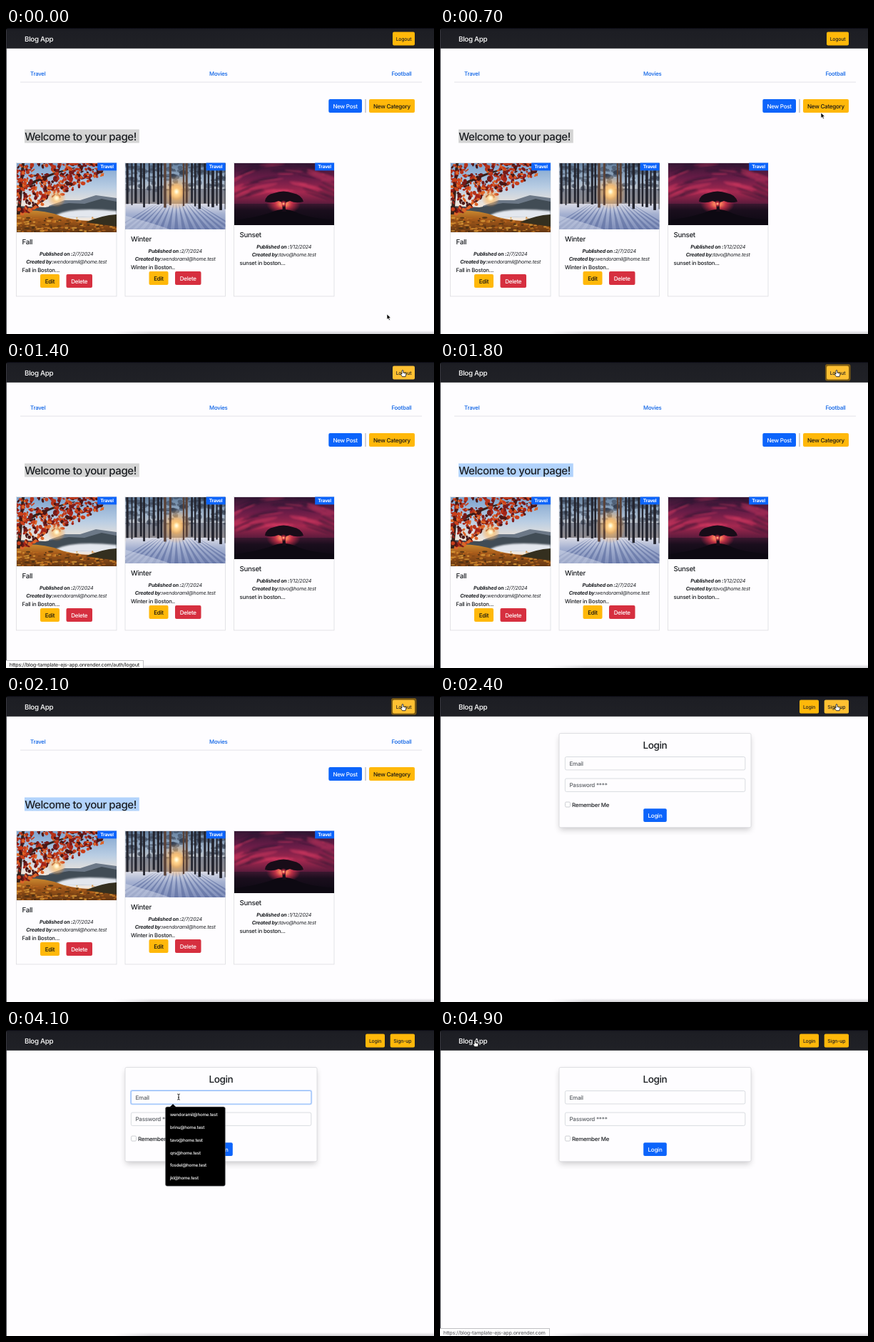
An HTML page that plays this animation: 600x430 px, repeating every 5 s.

```html
<!DOCTYPE html>
<html lang="en">
<head>
<meta charset="utf-8">
<title>Blog App</title>
<style>
html, body { margin: 0; width: 100%; height: 100%; overflow: hidden; background: #fefdff; }
svg { display: block; width: 100%; height: 100%; }
text {
  font-family: Inter, "Open Sans", sans-serif; font-weight: 450; letter-spacing: -.03em;
  text-rendering: geometricPrecision; white-space: pre;
}
</style>
</head>
<body>
<svg id="stage" viewBox="0 0 600 430"></svg>
<script>
const BLUE = '#0c64fb', AMBER = '#ffb80a', AMBER_HOVER = '#ffc032', RED = '#d62f3f', INK = '#1b1e22';
const LOOP = 5000, STEP = 100;
const SITE = 'https://blog-tamplate-ejs-app.onrender.com';

function random(seed) {
  return () => (seed = (seed * 16807) % 2147483647) / 2147483647;
}
const times = (n, fn) => Array.from({ length: n }, (_, i) => fn(i)).join('');
const rect = (x, y, w, h, fill, extra = '') =>
  `<rect x="${x}" y="${y}" width="${w}" height="${h}" fill="${fill}" ${extra}/>`;
const path = (d, fill, extra = '') => `<path d="${d}" fill="${fill}" ${extra}/>`;
const ellipse = (x, y, rx, ry, fill, extra = '') =>
  `<ellipse cx="${x}" cy="${y}" rx="${rx}" ry="${ry}" fill="${fill}" ${extra}/>`;
const group = (id, body) => `<g id="${id}">${body}</g>`;

// y is the middle of the line of text
const text = (x, y, size, str, fill = INK, extra = '') =>
  `<text x="${x}" y="${y + size * 0.36}" font-size="${size}" fill="${fill}" ${extra}>${str}</text>`;
const MID = 'text-anchor="middle"';
const weight = w => `style="font-weight:${w}"`;

function button(x, y, w, h, fill, label, color, size = 8, id = '') {
  return rect(x, y, w, h, fill, `rx="2" ${id && `id="${id}"`}`) +
    text(x + w / 2, y + h / 2 + 0.2, size, label, color, MID + ' ' + weight(500));
}

const stops = list => list.map(([at, c, o = 1]) =>
  `<stop offset="${at}" stop-color="${c}" stop-opacity="${o}"/>`).join('');
const linear = (id, list, dir = 'x2="0" y2="1"') => `<linearGradient id="${id}" ${dir}>${stops(list)}</linearGradient>`;
const radial = (id, list) => `<radialGradient id="${id}">${stops(list)}</radialGradient>`;
const clip = (id, x, h) => `<clipPath id="${id}">${rect(x, 190, 140, h, '#000')}</clipPath>`;

const defs = `<defs>
${linear('bar', [[0, '#191a20'], [.15, '#1d1e24'], [1, '#202126']])}
${linear('fallSky', [[0, '#7da3cf'], [.35, '#b9cde3'], [.62, '#f1e6da']])}
${linear('fallGround', [[0, '#c98a30'], [.4, '#a65a1a'], [1, '#5f3412']])}
${linear('winterSky', [[0, '#64809f'], [.4, '#a3b6cc'], [1, '#f3d9bd']])}
${linear('snow', [[0, '#dadbe6'], [.4, '#a4b0d0'], [1, '#7d8cb8']])}
${linear('duskSky', [[0, '#351734'], [.35, '#681c47'], [.7, '#a4284f'], [1, '#571a3b']])}
${linear('duskSea', [[0, '#3a172f'], [.3, '#1a0e1d'], [1, '#0b0811']])}
${linear('edge', [[0, '#cfced2', 0], [1, '#cfced2', 1]])}
${linear('edgeFade', [[0, '#fff', 0], [.12, '#fff', 1], [1, '#fff', 1]], 'x2="1" y2="0"')}
<mask id="edgeMask">${rect(150, 415, 450, 15, 'url(#edgeFade)')}</mask>
${radial('sun', [[0, '#fffdf0'], [.18, '#fff0c0'], [.4, '#ffc06a', .65], [1, '#ff9a38', 0]])}
${radial('redSun', [[0, '#fff0d0'], [.2, '#ff8a5c'], [.5, '#f03a50', .7], [1, '#e02a52', 0]])}
${clip('clipFall', 15, 97)}${clip('clipWinter', 167.5, 93)}${clip('clipDusk', 320, 87)}
<filter id="soft"><feGaussianBlur stdDeviation="1.2"/></filter>
<filter id="shade" x="-10%" y="-10%" width="120%" height="130%"><feGaussianBlur stdDeviation="4"/></filter>
</defs>`;

function fallPhoto() {
  const r = random(41);
  const reds = ['#a3241a', '#c93f1b', '#7a1a17', '#dc6428', '#4a1715', '#b5331a'];
  const grass = ['#e0a13c', '#6f3d14', '#b8661d', '#3f2a14', '#d08228'];
  const leaf = () => {
    const u = Math.pow(r(), 1.25), x = 13 + 122 * u, reach = 78 - 60 * u;
    const y = 189 + reach * r();
    return ellipse(x, y, 1.2 + 2.6 * r(), .9 + 1.8 * r(), reds[Math.floor(r() * 6)],
      `transform="rotate(${Math.floor(r() * 180)} ${x} ${y})"`);
  };
  return `<g clip-path="url(#clipFall)">` +
    rect(15, 190, 140, 97, 'url(#fallSky)') +
    path('M60 250L82 242 104 242 126 235 155 239V262H60Z', '#6c7887') +
    path('M15 250L55 252 88 246 110 247 134 240 155 244V266H15Z', '#414c55') +
    path('M70 263Q92 251 155 257V270Q108 264 70 269Z', '#e3e7ee', 'filter="url(#soft)"') +
    path('M15 257Q50 254 76 264T155 270V288H15Z', 'url(#fallGround)') +
    times(190, () => ellipse(15 + 140 * r(), 266 + 21 * r(), 1 + 3 * r(), .5 + r(), grass[Math.floor(r() * 5)], 'opacity=".75"')) +
    path('M112 273Q134 263 155 262V279Z', '#342f1f') +
    path('M15 262L22 190H26L20 262ZM19 226Q50 205 96 196L97 197Q50 209 20 231Z', '#35201a') +
    times(380, leaf) +
    ellipse(71, 239, 13, 13, 'url(#sun)') + '</g>';
}

function winterPhoto() {
  const r = random(77);
  const trunk = i => {
    const x = 167 + i * 6 + 3 * r(), w = 1.6 + 2.8 * r(), foot = 244 + 13 * r() * (w / 4);
    if (Math.abs(x - 238) < 4) return '';
    const tone = Math.abs(x - 239) < 18 ? '#5a4238' : '#23242e';
    return rect(x, 188, w, foot - 188, tone);
  };
  return `<g clip-path="url(#clipWinter)">` +
    rect(167, 190, 141, 62, 'url(#winterSky)') +
    rect(167, 226, 141, 22, '#555d70', 'opacity=".6"') +
    times(130, () => ellipse(167 + 141 * r(), 190 + 38 * Math.pow(r(), 1.4), 2 + 4 * r(), 1 + 3 * r(), '#303a4c', 'opacity=".5"')) +
    rect(167, 247, 141, 37, 'url(#snow)') +
    times(17, i => {
      const x = 150 + 11 * i, top = 239 + (x - 239) * .32;
      return path(`M${top} 246L${x - 2} 284H${x + 3 + 2 * r()}Z`, '#5a6c9e', 'opacity=".6"');
    }) +
    ellipse(239, 231, 22, 24, 'url(#sun)') +
    times(24, trunk) +
    path('M168 283V264Q205 274 230 283Z', '#d5dcec', 'opacity=".5"') +
    ellipse(239, 230, 11, 13, 'url(#sun)') + '</g>';
}

function duskPhoto() {
  const r = random(19);
  return `<g clip-path="url(#clipDusk)">` +
    rect(319, 190, 142, 58, 'url(#duskSky)') +
    times(46, () => {
      const x = 320 + 140 * r(), y = 191 + 46 * r();
      return ellipse(x, y, 8 + 13 * r(), 1 + 2 * r(), r() < .45 ? '#d83a62' : '#2b1230',
        `opacity=".42" filter="url(#soft)" transform="rotate(${(390 - x) * -.4} ${x} ${y})"`);
    }) +
    rect(319, 247, 142, 31, 'url(#duskSea)') +
    ellipse(389, 247, 24, 15, 'url(#redSun)') +
    path('M319 278V271Q355 265 372 259 389 251 407 259 424 267 461 270V278Z', '#0d0912') +
    path('M363 244Q364 234 376 232 389 227 402 232 414 234 417 244 407 247 398 243 390 247 382 243 373 247 363 244Z', '#180c18') +
    path('M387 258Q389 250 385 242H394Q390 250 393 258Z', '#180c18') +
    ellipse(389, 247, 5, 5, 'url(#redSun)') + '</g>';
}

function card(x, photo, photoEnd, title, date, author, body, owned) {
  const top = photoEnd + 14, mid = x + 70.2;
  const meta = (y, label, value) => text(mid, y, 7.1,
    `<tspan ${weight(700)}>${label}</tspan>${value}`, INK, MID + ' font-style="italic"');
  return rect(x, 189.5, 140.5, 187.5, '#fefdff', 'stroke="#dcdce0" stroke-width=".8"') + photo() +
    rect(x + 113.7, 189.5, 26.8, 10.8, BLUE) +
    text(x + 127.1, 194.8, 6.6, 'Travel', '#fff', MID + ' ' + weight(700)) +
    text(x + 8, top, 9.7, title, INK, weight(500)) +
    meta(top + 16.2, 'Published on :', date) +
    meta(top + 27.9, 'Created by:', author) +
    text(x + 8, top + 39.6, 7.8, body) +
    (owned ? button(x + 33.5, top + 45.2, 27, 19, AMBER, 'Edit', '#111') +
      button(x + 70, top + 45.2, 36.5, 19, RED, 'Delete', '#fff') : '');
}

const blogPage = () =>
  rect(540, 3, 35.5, 23.5, '#7a5a14', 'rx="3" id="ring"') +
  button(542, 5.5, 31, 19, AMBER, 'Logout', '#222', 6.9, 'logout') +
  text(34, 64, 7.8, 'Travel', '#0b62e6') + text(285, 64, 7.8, 'Movies', '#0b62e6') +
  text(568.5, 64, 7.9, 'Football', '#0b62e6', 'text-anchor="end"') +
  rect(20, 75.6, 563, .9, '#dfe0e5') +
  button(452.3, 100, 46.7, 19, BLUE, 'New Post', '#fff') +
  rect(503, 100, 2, 19, '#d2d1d4') +
  button(509, 100, 64, 19, AMBER, 'New Category', '#161616') +
  rect(26, 142.5, 160.8, 19, '#d4d4d4', 'id="mark"') +
  text(26.2, 152.3, 15.05, 'Welcome to your page!', INK, weight(550)) +
  card(14.5, fallPhoto, 286.8, 'Fall', '2/7/2024', 'wendoramil@home.test', 'Fall in Boston...', true) +
  card(167, winterPhoto, 282.8, 'Winter', '2/7/2024', 'wendoramil@home.test', 'Winter in Boston..', true) +
  card(319.5, duskPhoto, 276.8, 'Sunset', '1/12/2024', 'tavo@home.test', 'sunset in boston...', false);

const field = (y, label, id) =>
  rect(175.4, y, 252.4, 18.4, '#fefdff', `rx="2" stroke="#d0d3d8" stroke-width=".8" id="${id}"`) +
  text(181.5, y + 9.3, 8, label, '#5c6065');

const guesses = ['wendoramil', 'brinu', 'tavo', 'qrs', 'fosdel', 'jkl'];

const loginPage = () =>
  button(504, 5.5, 27, 19, AMBER, 'Login', '#222', 6.9) +
  button(538.7, 5.5, 34.3, 19, AMBER, 'Sign-up', '#222', 7, 'signup') +
  rect(168, 57, 267, 131, '#000', 'opacity=".2" filter="url(#shade)"') +
  rect(167, 52.5, 269, 132.3, '#fefdff', 'rx="2" stroke="#d8d8dc" stroke-width=".8"') +
  text(301.4, 69.2, 13.6, 'Login', INK, MID + ' ' + weight(550)) +
  rect(174, 84, 255.2, 21.2, '#c0d8fd', 'rx="3" id="glow"') +
  field(85.5, 'Email', 'email') + field(116, 'Password ****', 'password') +
  rect(175.5, 149, 7, 7, '#fff', 'rx="1.5" stroke="#bfc2c8" stroke-width=".8"') +
  text(185, 152.7, 7.9, 'Remember Me') +
  button(285.2, 158.3, 32.6, 18.8, BLUE, 'Login', '#fff') +
  group('guesses',
    rect(223.5, 108, 83.8, 111.3, '#000', 'rx="2.5" stroke="#77777c" stroke-width=".6"') +
    path('M229.5 108.6L234 104 238.5 108.6Z', '#000') +
    guesses.map((name, i) => text(230, 119 + 17.8 * i, 6.2, name + '@home.test', '#fff', weight(500))).join(''));

const statusBar = (id, w, url, color) => group(id,
  rect(-1, 419.5, w + 1, 12, '#fff', 'stroke="#b9b9bd" stroke-width=".9"') + text(4.8, 425.8, 7.15, url, color));

const outline = 'stroke-linejoin="round"';
const cursors =
  group('arrow', path('M0 0V7.6L1.8 6 3 8.8 4.4 8.2 3.2 5.5H5.6Z', '#000', `stroke="#fff" stroke-width=".7" ${outline}`)) +
  group('hand', path('M-1 0Q0-1.3 1 0V3L4 3.7Q5 4 4.8 5.5L4 8.6H-.4L-2.8 5.2Q-2.8 4-1 5Z', '#fff', `stroke="#111" stroke-width=".8" ${outline}`)) +
  group('beam', path('M-1.8-4Q0-4 0-3 0-4 1.8-4M0-3V3M-1.8 4Q0 4 0 3 0 4 1.8 4M-1 .8H1', 'none', 'stroke="#111" stroke-width=".9"'));

document.getElementById('stage').innerHTML = defs +
  rect(0, 0, 600, 430, '#fefdff') +
  rect(0, 0, 600, 28.8, 'url(#bar)') + rect(0, 0, 600, 1, '#0b0b14') +
  text(26, 15, 9.8, 'Blog App', '#fff', weight(500)) +
  group('blog', blogPage()) + group('login', loginPage()) +
  `<g mask="url(#edgeMask)">${rect(150, 425, 450, 5, 'url(#edge)')}</g>` +
  rect(0, 0, .9, 430, '#3a3a42') + path('M0 0H4Q0 0 0 4Z', '#000') +
  statusBar('linkOut', 192.5, SITE + '/auth/logout', '#333') +
  statusBar('linkHome', 153.5, SITE, '#66666a') +
  group('cursor', cursors);

const el = id => document.getElementById(id);
const show = (id, on) => el(id).setAttribute('visibility', on ? 'inherit' : 'hidden');
const paint = (id, fill) => el(id).setAttribute('fill', fill);

// time, x, y of the pointer
const route = [
  [0, 534, 402], [100, 534, 402], [700, 534, 119], [800, 535, 112], [1200, 556, 12], [2500, 556, 12],
  [2900, 250, 128], [3000, 250, 150], [3100, 311, 160], [3200, 242, 94], [4100, 242, 94],
  [4500, 59, 18], [4700, 49, 15], [5000, 49, 15]
];

function pointer(t) {
  const i = route.findIndex(key => key[0] > t);
  const [t0, x0, y0] = route[i - 1], [t1, x1, y1] = route[i];
  const u = (t - t0) / (t1 - t0), e = u * u * (3 - 2 * u);
  return [x0 + (x1 - x0) * e, y0 + (y1 - y0) * e];
}

function draw(now) {
  const t = Math.floor((now % LOOP) / STEP) * STEP;
  const within = (a, b) => t >= a && t < b;
  const login = t >= 2400, clicked = t >= 1600, focus = within(3500, 4600);
  const overButton = within(1200, 2600);

  show('blog', !login);
  show('login', login);
  show('ring', clicked && !login);
  paint('logout', overButton ? AMBER_HOVER : AMBER);
  paint('signup', overButton ? AMBER_HOVER : AMBER);
  paint('mark', clicked ? '#b2d3fc' : '#d4d4d4');
  show('glow', focus);
  el('email').setAttribute('stroke', focus ? '#86b4f8' : '#d0d3d8');
  show('guesses', within(3600, 4600));
  show('linkOut', within(1300, 1800));
  show('linkHome', t >= 4700);

  const kind = overButton || t >= 4600 ? 'hand' : within(3200, 4200) ? 'beam' : 'arrow';
  for (const id of ['arrow', 'hand', 'beam']) show(id, id === kind);
  el('cursor').setAttribute('transform', `translate(${pointer(t)})`);
}

function tick() {
  draw(performance.now());
  requestAnimationFrame(tick);
}
tick();
</script>
</body>
</html>
```
